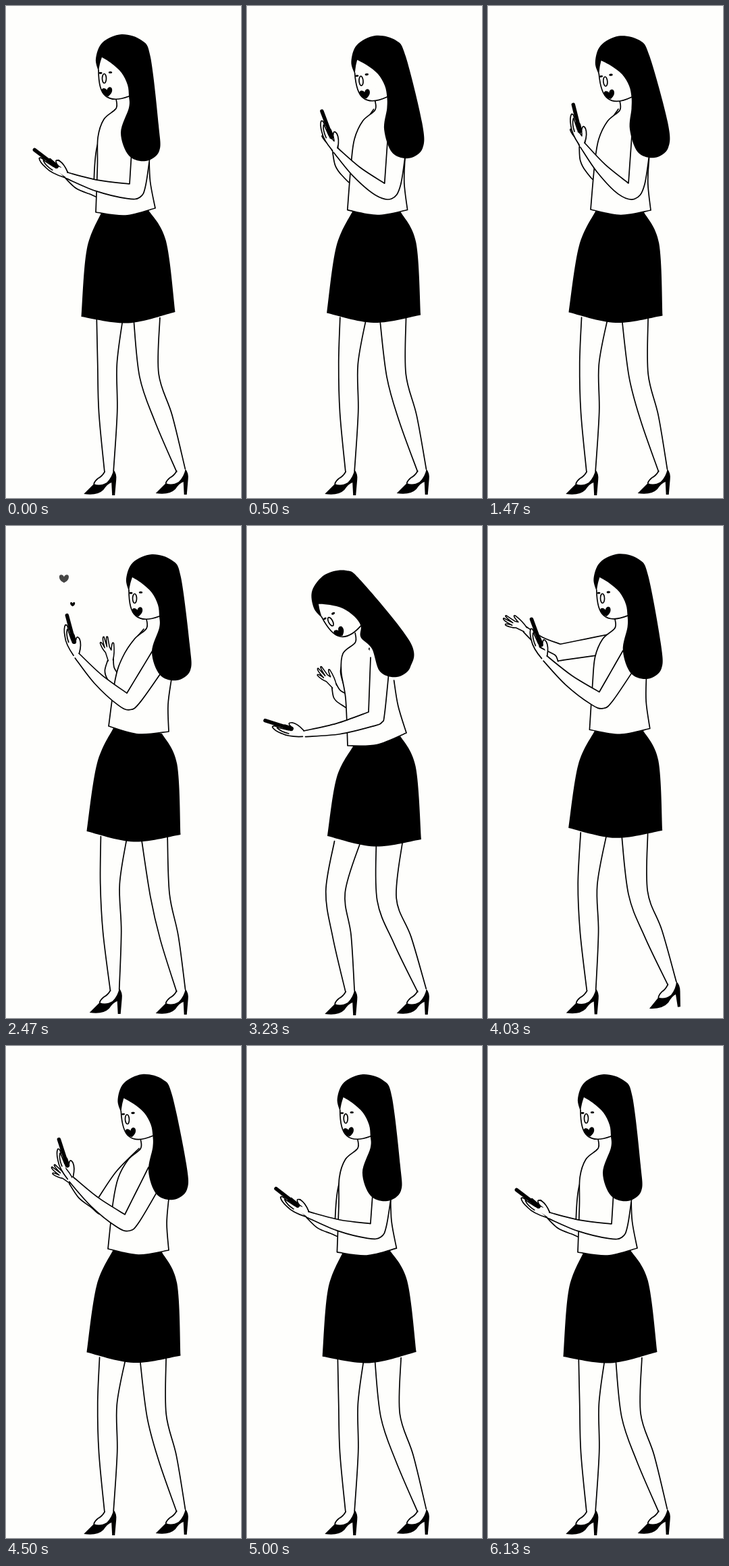
Recreate the animation shown at these times as an HTML page with a canvas. Size 348 by 730 pixels, loop 6160 ms.

```html
<!DOCTYPE html>
<html lang="en">
<head>
<meta charset="utf-8">
<title>Woman with phone</title>
<style>
html, body { margin: 0; width: 100%; height: 100%; overflow: hidden; background: #fefefc; }
canvas { display: block; width: 348px; height: 730px; }
</style>
</head>
<body>
<canvas id="stage"></canvas>
<script>
const W = 348, H = 730, LOOP = 6160, PAPER = '#fefefc', INK = '#000', LINE = 1.7;
const canvas = document.getElementById('stage');
const ctx = canvas.getContext('2d');
const dpr = window.devicePixelRatio || 1;
canvas.width = W * dpr;
canvas.height = H * dpr;

// Points and vectors
const add = (p, x, y) => [p[0] + x, p[1] + y];
const along = (p, n, d) => [p[0] + n[0] * d, p[1] + n[1] * d];
const lerp = (p, q, k) => p.map((v, i) => v + (q[i] - v) * k);
const unit = (p, q) => {
  const x = q[0] - p[0], y = q[1] - p[1], d = Math.hypot(x, y) || 1;
  return [x / d, y / d];
};
const rad = deg => deg * Math.PI / 180;
const spin = ([x, y], deg) => {
  const c = Math.cos(rad(deg)), s = Math.sin(rad(deg));
  return [x * c - y * s, x * s + y * c];
};

// Joints of the body; elbows are the inner corners of the bent arms.
const rest = {
  head: [185, 128], tilt: [-3], tip: [248, 228],
  hemL: [151, 301], hemR: [241, 303], skirt: [189, 457], slant: [2.5],
  shoulder: [211, 180], elbow: [176, 250], wrist: [99, 194], phone: [-18],
  farShoulder: [197, 152], farElbow: [137, 225], farWrist: [99, 197], farTurn: [-47]
};
const body = joints => ({ ...rest, ...joints });
const text = body({
  head: [150, 127], tilt: [0], tip: [207, 230],
  hemL: [133, 306], hemR: [221, 300], skirt: [181, 457.5], slant: [-3.5],
  shoulder: [187, 200], elbow: [183, 264], wrist: [91, 247], phone: [-53],
  farShoulder: [161, 154], farElbow: [130, 262], farWrist: [91, 247]
});
const read = body({
  head: [180, 131], tilt: [-5], tip: [247, 225], hemL: [152, 302],
  shoulder: [213, 192], elbow: [208, 263], wrist: [143, 203], phone: [-14],
  farShoulder: [193, 153], farElbow: [161, 237], farWrist: [143, 205], farTurn: [-15]
});
const love = body({
  head: [195, 127], tilt: [0], tip: [253, 229],
  hemL: [152, 297], hemR: [241, 305], skirt: [189, 455.5],
  shoulder: [217, 185], elbow: [179, 248], wrist: [108, 189], phone: [-15],
  farShoulder: [204, 153], farElbow: [167, 221], farWrist: [159, 197], farTurn: [-10]
});
const bow = body({
  head: [137, 157], tilt: [-28], tip: [222, 224],
  hemL: [149, 326], hemR: [236, 307], skirt: [188.5, 462.5],
  shoulder: [183, 195], elbow: [180, 276], wrist: [84, 304], phone: [-72.5],
  farShoulder: [152, 180], farElbow: [149, 250], farWrist: [132, 234], farTurn: [-36]
});
const wave = body({
  head: [168, 126], tilt: [0], tip: [230, 226],
  hemL: [150, 303], hemR: [239, 299], skirt: [188.5, 445.5], slant: [1.5],
  shoulder: [193, 188], elbow: [158, 244], wrist: [80, 192], phone: [-21.5],
  farShoulder: [178, 164], farElbow: [95, 163], farWrist: [98, 119], farTurn: [5]
});

// Legs: front and back knee and ankle, turn of the back shoe.
const stand = { knee: [150, 531], foot: [152.5, 690], knee2: [212, 548], foot2: [259, 689], turn: [0] };
const lean = { ...stand, knee2: [223, 548] };
const proud = { ...lean, knee: [154, 531], foot: [161, 688], knee2: [228, 548] };
const bend = { ...stand, knee: [131, 543], knee2: [207, 554] };
const lift = { knee: [140, 533], foot: [154.5, 684], knee2: [220, 534], foot2: [308, 653], turn: [-20] };
const kick = { ...lift, foot2: [314, 646], turn: [-24] };

function mix(p, q, k) {
  const out = {};
  for (const key in p) out[key] = lerp(p[key], q[key], k);
  return out;
}
const cheer = { ...mix(bow, wave, .8), farElbow: [100, 145], farWrist: [100, 55], farTurn: [4] };
const sweep = { ...mix(wave, rest, .4), farElbow: [108, 176], farWrist: [54, 151], farTurn: [-60] };

const bodyKeys = [
  [0, text], [20, text], [680, read], [1910, read], [2440, love], [2560, love],
  [3170, bow], [3240, bow], [3530, cheer], [3670, wave], [3760, wave], [4080, sweep],
  [4470, rest], [4530, rest], [5050, text], [LOOP, text]
];
const legKeys = [
  [0, stand], [20, stand], [680, lean], [1910, lean], [2180, kick], [2460, proud],
  [2560, proud], [3170, bend], [3240, bend], [3670, lift], [3770, kick],
  [4160, lean], [4500, lean], [5050, stand], [5710, stand], [5920, kick],
  [6120, stand], [LOOP, stand]
];
function poseAt(keys, t) {
  let i = 0;
  while (i < keys.length - 2 && t >= keys[i + 1][0]) i++;
  const [t0, p] = keys[i], [t1, q] = keys[i + 1];
  const k = Math.min(1, Math.max(0, (t - t0) / (t1 - t0)));
  return mix(p, q, (1 - Math.cos(Math.PI * k)) / 2);
}

// Smooth path through the points; a doubled point is a sharp corner.
function curve(pts) {
  const path = new Path2D();
  path.moveTo(...pts[0]);
  for (let i = 0; i < pts.length - 1; i++) {
    const p = pts[i], q = pts[i + 1];
    if (p[0] === q[0] && p[1] === q[1]) continue;
    const o = pts[i - 1] || p, r = pts[i + 2] || q;
    path.bezierCurveTo(p[0] + (q[0] - o[0]) / 6, p[1] + (q[1] - o[1]) / 6,
      q[0] - (r[0] - p[0]) / 6, q[1] - (r[1] - p[1]) / 6, q[0], q[1]);
  }
  return path;
}
function paint(path, color) {
  ctx.fillStyle = color;
  ctx.fill(path);
}
const fill = (pts, color) => paint(curve(pts), color);
const line = pts => ctx.stroke(curve(pts));
function outline(path) { paint(path, PAPER); ctx.stroke(path); }

// Two open edges running the same way, filled between.
function limb(one, two) {
  const back = two.slice().reverse();
  fill([...one, one[one.length - 1], back[0], ...back], PAPER);
  line(one);
  line(two);
}
function at([x, y], deg, draw) {
  ctx.save();
  ctx.translate(x, y);
  ctx.rotate(rad(deg));
  draw();
  ctx.restore();
}

const HEART = new Path2D('M0 7C-4 5 -8 2 -8 -3C-8 -8 -2 -8 0 -3C2 -8 8 -8 8 -3C8 2 4 5 0 7Z');
const SHOE = new Path2D('M-44 34L-29 19Q-20 23 -10 17Q-2 9 0 -2Q5 4 4 13L2 36H-2L-3 17Q-9 19 -15 28Q-24 37 -44 34Z');
const FOOT = new Path2D('M-13 1Q-17 8 -23 11Q-28 15 -29 19');
const OPEN_HAND = new Path2D('M-4 1L-6 -12Q-11 -19 -12 -27Q-10 -31 -6 -19Q-8 -37 -4 -35L-2 -20Q-1 -38 2 -34L2 -19L4 -14Q8 -28 10 -23Q9 -9 4 1');
const FINGERS = new Path2D('M-6 19Q-13 0 -11 -12Q-10 -24 -6 -28Q-2 -28 -4 -18L-3 -4M-8 -2Q-9 -14 -5 -21');
const THUMB = new Path2D('M3 18Q10 6 9 -2Q7 -10 3 -2');

function heart(p, size, deg = 0) {
  at(p, deg, () => {
    ctx.scale(size / 16, size / 16);
    paint(HEART, INK);
  });
}

function drawLeg(hip, knee, foot, turn) {
  const calf = lerp(knee, foot, .45);
  const joints = [hip, knee, calf, foot], half = [19.5, 14.3, 13.6, 6.7];
  const edge = side => joints.map((p, i) => {
    const [x, y] = unit(joints[Math.max(0, i - 1)], joints[Math.min(3, i + 1)]);
    return along(p, i ? [y, -x] : [1, 0], half[i] * side);
  });
  limb(edge(-1), edge(1));
  at(along(foot, spin([1, 0], turn), 6.7), turn, () => {
    paint(FOOT, PAPER);
    ctx.stroke(FOOT);
    paint(SHOE, INK);
  });
}
function drawLegs(l, [cx, cy]) {
  const hip = (knee, x, k) => [cx + x + k * (knee[0] - cx), cy + 5];
  drawLeg(hip(l.knee2, 15, .4), l.knee2, l.foot2, l.turn[0]);
  drawLeg(hip(l.knee, -13, .46), l.knee, l.foot, 0);
}

function drawSkirt(p) {
  const left = add(p.hemL, 8, 1), right = add(p.hemR, -10, 3), s = p.slant[0];
  const bl = add(p.skirt, -69.5, -s), br = add(p.skirt, 69.5, s);
  fill([left, add(lerp(left, bl, .35), -11, 0), bl, bl, add(p.skirt, 0, 13),
    br, br, add(lerp(right, br, .3), 14, 0), right], INK);
}

function drawTorso(p, collar) {
  const run = collar[0] - p.hemL[0], rise = .5 * run - 24;
  const front = [add(collar, 0, -14), collar, add(collar, -18, 16),
    add(collar, -17 - .33 * run, 43), add(p.hemL, .28 * run - 6, -69), p.hemL];
  const hem = add(lerp(p.hemL, p.hemR, .5), 0, 8);
  outline(curve([...front, p.hemL, hem, p.hemR, p.hemR,
    add(p.hemR, rise / 2 - 3, -40), add(p.hemR, rise, -78)]));
}

// Bent arm: the inner edge has a sharp elbow, the outer edge a round one.
function drawArm(shoulder, elbow, wrist, width, slack) {
  const [ux, uy] = unit(elbow, shoulder), [fx, fy] = unit(elbow, wrist);
  const up = [-uy, ux], fore = [fy, -fx];
  const mid = unit([0, 0], [up[0] + fore[0], up[1] + fore[1]]);
  const outElbow = along(elbow, fore, width), outWrist = along(wrist, fore, 9);
  limb(
    [shoulder, along(lerp(shoulder, elbow, .5), up, -slack * uy ** 4), elbow, elbow,
      along(lerp(elbow, wrist, .5), fore, 3), wrist],
    [along(shoulder, up, 29), along(elbow, up, 24), along(elbow, mid, 25), outElbow,
      along(lerp(outElbow, outWrist, .5), fore, 4), outWrist]
  );
  return lerp(wrist, outWrist, .5);
}

function drawPhone(wrist, deg) {
  at(wrist, deg, () => {
    ctx.translate(-2.5, -18);
    paint(FINGERS, PAPER);
    paint(THUMB, PAPER);
    ctx.stroke(FINGERS);
    ctx.stroke(THUMB);
    ctx.lineWidth = 5.5;
    line([[0, 0], [0, -41]]);
    ctx.lineWidth = 7;
    line([[0, -1], [0, -10]]);
    ctx.lineWidth = LINE;
  });
}

function oval(x, y, rx, ry) {
  const path = new Path2D();
  path.ellipse(x, y, rx, ry, 0, 0, 7);
  return path;
}
function drawHead(p) {
  const tilt = p.tilt[0];
  const place = (x, y) => add(p.head, ...spin([x, y], tilt));
  at(p.head, tilt, () => {
    outline(new Path2D('M-13 -32Q-13 -2 -3 6Q8 16 32 7'));
    paint(oval(-10, -27.5, 2.6, 1.4), INK);
    paint(oval(4.5, -28.5, 2.8, 1.6), INK);
    ctx.stroke(oval(-4.5, -19.5, 3, 7));
    heart([0, .5], 15.5, -11);
  });
  const nape = place(32, 7), part = place(-8, -51), temple = place(-13, -30);
  const crown = [temple, place(-17, -49), place(-7, -73), place(21, -85), place(51, -76), place(64, -51)];
  const lock = [add(p.tip, 19, -53), add(p.tip, 20, -15), p.tip, add(p.tip, -25, -8),
    add(p.tip, -37, -42), add(nape, 0, 17)];
  const fringe = [nape, place(30, -10), place(21, -28), place(6, -42), part, part, place(-11, -41), temple];
  fill([...crown, ...lock, ...fringe], INK);
}

function drawBody(p) {
  const collar = add(p.head, ...spin([13, 25], p.tilt[0]));
  drawSkirt(p);
  const palm = drawArm(p.farShoulder, p.farElbow, p.farWrist, 18, 12);
  at(palm, p.farTurn[0], () => {
    ctx.scale(.9, 1);
    outline(OPEN_HAND);
  });
  drawTorso(p, collar);
  drawArm(p.shoulder, p.elbow, p.wrist, 22, 0);
  drawPhone(p.wrist, p.phone[0]);
  drawHead(p);
}

function drawHearts(t) {
  for (const birth of [2130, 2370]) {
    const age = t - birth;
    if (age < 0 || age > 560) continue;
    ctx.globalAlpha = 1 - (age / 560) ** 2.6;
    heart([104 - age * .053, 132 - age * .158], 4.2 + age * .029);
    ctx.globalAlpha = 1;
  }
}

function frame(now) {
  const t = now % LOOP, p = poseAt(bodyKeys, t);
  ctx.setTransform(dpr, 0, 0, dpr, 0, 0);
  ctx.fillStyle = PAPER;
  ctx.fillRect(0, 0, W, H);
  ctx.strokeStyle = INK;
  ctx.lineWidth = LINE;
  ctx.lineCap = ctx.lineJoin = 'round';
  drawLegs(poseAt(legKeys, t), p.skirt);
  drawBody(p);
  drawHearts(t);
}

const begin = performance.now();
function tick() {
  frame(performance.now() - begin);
  requestAnimationFrame(tick);
}
tick();
</script>
</body>
</html>
```
